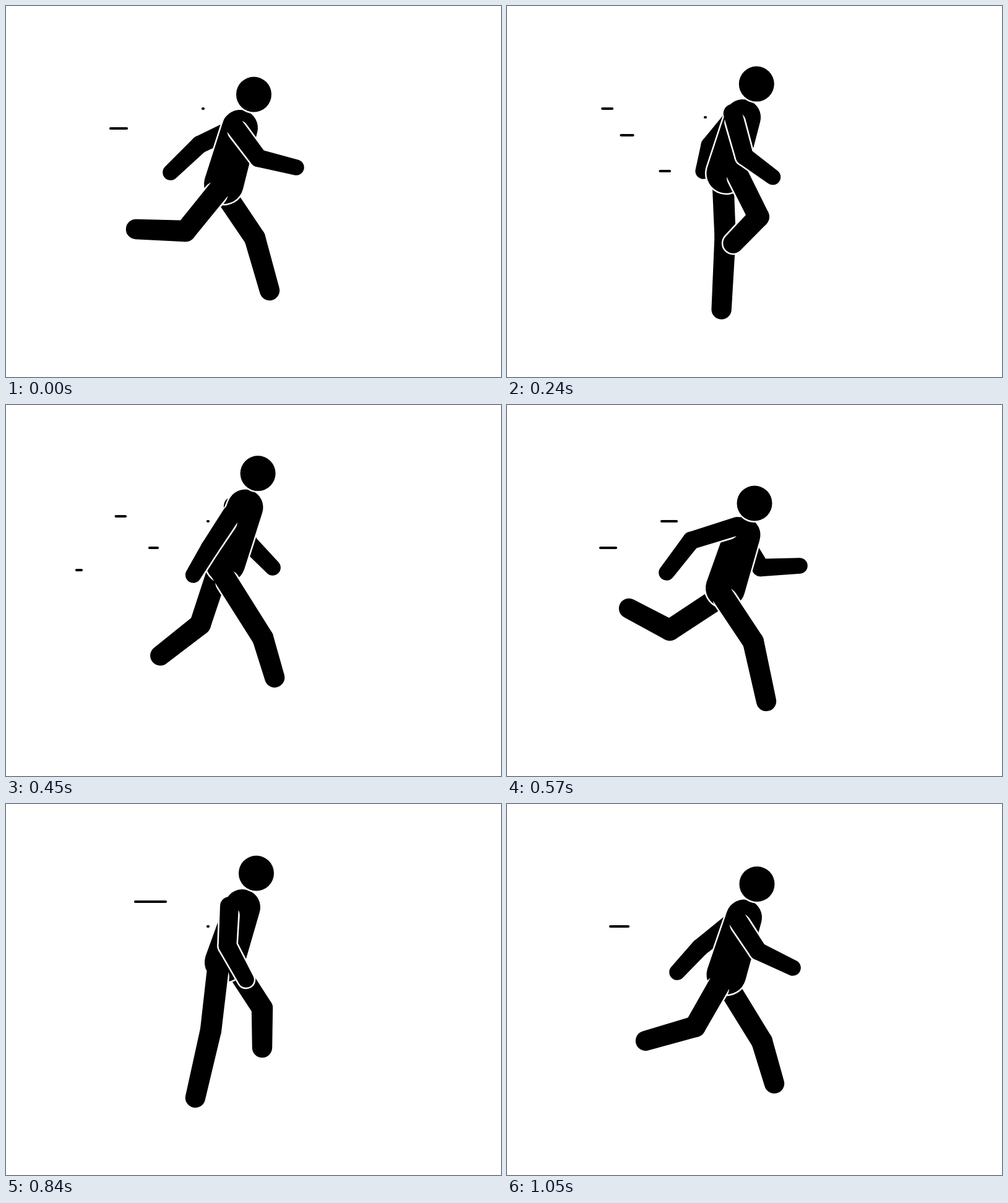
An HTML page with a canvas that plays this animation: 800 by 600 pixels, repeating every 1080 ms.

```html
<!DOCTYPE html>
<html lang="en">
<head>
<meta charset="utf-8">
<title>Runner</title>
<style>
html, body { margin: 0; width: 100%; height: 100%; overflow: hidden; background: #fff; }
canvas { display: block; }
</style>
</head>
<body>
<canvas id="stage" width="800" height="600"></canvas>
<script>
const ctx = document.getElementById('stage').getContext('2d');
const LOOP = 1080, HALF = LOOP / 2, STEP = 30, GAP = 2.5;

// time, head x y, shoulder x y, hip x y (repeats every half loop)
const body = [
  [0, 400.5, 143, 378, 197, 352, 288],
  [30, 400, 159, 380.5, 210, 353, 296],
  [150, 401.5, 146, 379.5, 199, 353.5, 286],
  [300, 404.5, 112, 382, 167, 353, 256],
  [330, 405, 106, 382, 162, 351, 247],
  [510, 404, 129.5, 383, 183.5, 354.5, 276]
];

// time, root x y, middle joint x y, tip x y
const nearLegPoses = [
  [0, 350, 290, 290, 364, 210, 361],
  [150, 352, 290, 362, 375, 293, 336],
  [330, 348, 252, 406, 331, 415, 411],
  [570, 343, 300, 398, 383, 419, 479],
  [690, 347, 290, 373, 390, 372, 480],
  [840, 343, 262, 331, 366, 306, 475],
  [1050, 348, 283, 304, 360, 224, 383]
];
const farLegPoses = [
  [0, 350, 298, 402, 375, 426, 460],
  [150, 348, 300, 375, 383, 370, 480],
  [330, 337, 262, 320, 364, 279, 449],
  [570, 354, 304, 263, 364, 197, 329],
  [690, 360, 300, 364, 390, 294, 345],
  [840, 362, 250, 414, 330, 414, 394],
  [1050, 353, 288, 412, 384, 432, 452]
];
const nearArmPoses = [
  [0, 366, 190, 408, 246, 469, 261],
  [150, 367, 190, 402, 253, 460, 263],
  [330, 362, 160, 358, 231, 375, 283],
  [570, 372, 196, 298, 219, 258, 271],
  [690, 369, 184, 307, 227, 299, 280],
  [840, 361, 165, 358, 229, 388, 284],
  [1050, 369, 182, 406, 238, 462, 265]
];
const farArmPoses = [
  [0, 368, 198, 313, 224, 266, 269],
  [150, 368, 195, 308, 230, 274, 272],
  [330, 365, 165, 352, 215, 362, 250],
  [570, 380, 215, 410, 263, 473, 260],
  [690, 378, 200, 385, 270, 437, 270],
  [840, 365, 175, 352, 220, 360, 250],
  [1050, 365, 190, 312, 232, 275, 272]
];

// speed lines: y, then [time, left, right] keys
const dashes = [
  [166, [0, 316, 321], [150, 219, 262], [270, 130, 142]],
  [209, [30, 316, 321], [150, 228, 260], [330, 137, 151], [359, 125, 130]],
  [267, [150, 311, 316], [330, 180, 214], [450, 112, 124]],
  [180, [240, 318, 323], [330, 257, 291], [510, 135, 147]],
  [231, [330, 311, 316], [570, 149, 178], [660, 108, 116]],
  [188, [450, 324, 329], [570, 248, 276], [690, 188, 213], [810, 120, 128]],
  [158, [690, 344, 354], [840, 207, 260], [990, 107, 120]],
  [198, [840, 324, 329], [1050, 165, 198], [1080, 167, 197], [1170, 107, 114]]
];

// Smooth periodic curve through rows of [time, ...values]
function sample(rows, time, period) {
  const n = rows.length;
  time %= period;
  const row = i => {
    const k = (i + n) % n, turn = Math.floor(i / n) * period;
    return [rows[k][0] + turn, ...rows[k].slice(1)];
  };
  let i = n - 1;
  while (rows[i][0] > time) i--;
  const [a, b, c, d] = [row(i - 1), row(i), row(i + 1), row(i + 2)];
  const h = c[0] - b[0], u = (time - b[0]) / h;
  const slope = (p, q, r, j) => {
    const s = q[0] - p[0], t = r[0] - q[0];
    return ((q[j] - p[j]) / s * t + (r[j] - q[j]) / t * s) / (s + t);
  };
  return b.slice(1).map((from, k) => {
    const j = k + 1, to = c[j];
    return from + (to - from) * u * u * (3 - 2 * u)
      + h * u * (1 - u) * ((1 - u) * slope(a, b, c, j) - u * slope(b, c, d, j));
  });
}

// Turn joint positions into root offset, angles and lengths; at is the body index of the root
const polar = at => ([t, x, y, mx, my, ex, ey]) => {
  const b = sample(body, t, HALF);
  return [t, x - b[at], y - b[at + 1],
    Math.atan2(mx - x, my - y), Math.hypot(mx - x, my - y),
    Math.atan2(ex - mx, ey - my), Math.hypot(ex - mx, ey - my)];
};

// Both sides run the same cycle half a loop apart, so each fills the other's gaps
function track(own, other, at, minGap) {
  const ownRows = own.map(polar(at));
  const extra = other.map(polar(at))
    .map(([t, ...v]) => [(t + HALF) % LOOP, ...v])
    .filter(r => ownRows.every(o => Math.abs(o[0] - r[0]) >= minGap));
  return { at, rows: [...ownRows, ...extra].sort((p, q) => p[0] - q[0]) };
}
const nearLeg = track(nearLegPoses, farLegPoses, 4, 1);
const farLeg = track(farLegPoses, nearLegPoses, 4, 1);
const nearArm = track(nearArmPoses, farArmPoses, 2, 45);
const farArm = track(farArmPoses, nearArmPoses, 2, 45);

function capsule(x1, y1, r1, x2, y2, r2, color) {
  const a = Math.atan2(y2 - y1, x2 - x1);
  const b = Math.acos((r1 - r2) / Math.hypot(x2 - x1, y2 - y1));
  ctx.fillStyle = color;
  ctx.beginPath();
  ctx.arc(x1, y1, r1, a + b, a - b + 2 * Math.PI);
  ctx.arc(x2, y2, r2, a - b, a + b);
  ctx.fill();
}

function disc(x, y, r, color) {
  ctx.fillStyle = color;
  ctx.beginPath();
  ctx.arc(x, y, r, 0, 2 * Math.PI);
  ctx.fill();
}

// skip is where along the upper part the white edge begins; 0 means no edge
function limb({ at, rows }, b, time, [r1, r2, r3], skip) {
  const [dx, dy, a1, l1, a2, l2] = sample(rows, time, LOOP);
  const x = b[at] + dx, y = b[at + 1] + dy;
  const mx = x + l1 * Math.sin(a1), my = y + l1 * Math.cos(a1);
  const ex = mx + l2 * Math.sin(a2), ey = my + l2 * Math.cos(a2);
  if (skip) {
    const sx = x + skip * Math.sin(a1), sy = y + skip * Math.cos(a1);
    capsule(sx, sy, r1 + GAP, mx, my, r2 + GAP, '#fff');
    capsule(mx, my, r2 + GAP, ex, ey, r3 + GAP, '#fff');
  }
  capsule(x, y, r1, mx, my, r2, '#000');
  capsule(mx, my, r2, ex, ey, r3, '#000');
}

function dash([y, ...keys], time) {
  const i = keys.findIndex((k, n) => n && time >= keys[n - 1][0] && time <= k[0]);
  if (i < 0) return;
  const [t0, l0, r0] = keys[i - 1], [t1, l1, r1] = keys[i];
  const u = (time - t0) / (t1 - t0);
  ctx.beginPath();
  ctx.moveTo(l0 + (l1 - l0) * u + 2, y);
  ctx.lineTo(r0 + (r1 - r0) * u - 2, y);
  ctx.stroke();
}

const LEG = [17.5, 17.2, 16.2], ARM = [15, 14.3, 12.8];

function draw(time) {
  ctx.fillStyle = '#fff';
  ctx.fillRect(0, 0, 800, 600);
  ctx.lineWidth = 4.2;
  ctx.lineCap = 'round';
  ctx.strokeStyle = '#000';
  for (const d of dashes) {
    dash(d, time);
    dash(d, time + LOOP);
  }

  const b = sample(body, time, HALF);
  const [hx, hy, sx, sy, px, py] = b;
  limb(farArm, b, time, ARM, 0);
  limb(farLeg, b, time, LEG, 0);
  capsule(sx, sy, 29 + GAP, px, py, 32 + GAP, '#fff');
  capsule(sx, sy, 29, px, py, 32, '#000');
  limb(nearLeg, b, time, LEG, 18);
  limb(nearArm, b, time, ARM, 15);
  disc(hx, hy, 28.5 + GAP, '#fff');
  disc(hx, hy, 28.5, '#000');
}

const start = performance.now();
function tick() {
  const t = (performance.now() - start) % LOOP;
  draw(Math.floor(t / STEP) * STEP);
  requestAnimationFrame(tick);
}
tick();
</script>
</body>
</html>
```
